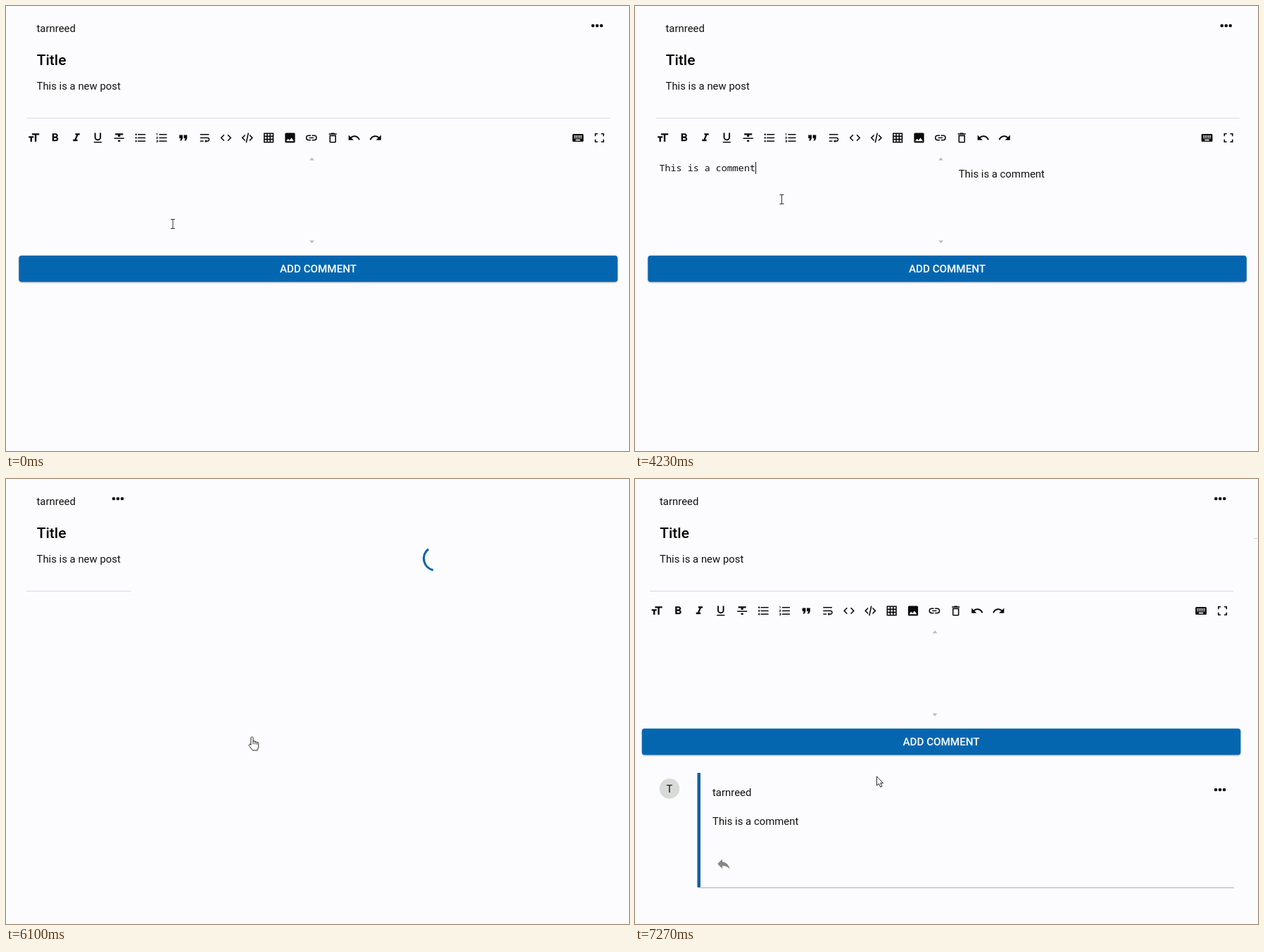
These frames come from a looping animation (885x633 px, 7330 ms). An HTML page:

```html
<!DOCTYPE html>
<html lang="en">
<head>
<meta charset="utf-8">
<title>Adding a comment</title>
<style>
html, body { margin: 0; width: 100%; height: 100%; overflow: hidden; background: #fcfcfe; }
svg { display: block; width: 885px; height: 633px; font: 14.9px Roboto, sans-serif; fill: #111; }
.title { font-size: 21px; font-weight: 500; fill: #000; }
.mono { font: 13.39px "Noto Sans Mono", monospace; white-space: pre; }
.label { font-size: 15.2px; font-weight: 500; fill: #fff; }
.icon { fill: #0a0a0a; fill-rule: evenodd; }
.line { fill: none; stroke: #0a0a0a; stroke-width: 2; }
.arrow { fill: #bcbcb8; }
.pointer { fill: #fff; stroke: #111; stroke-width: .9; stroke-linejoin: round; }
</style>
</head>
<body>
<svg viewBox="0 0 885 633">
  <rect width="885" height="633" fill="#fcfcfe"/>
  <g id="page">
    <text x="43.5" y="37">tarnreed</text>
    <text class="title" x="43.7" y="84">Title</text>
    <text x="43.5" y="119">This is a new post</text>
    <path id="rule" stroke="#d6d7ee"/>
    <g id="menu"><g class="dots"></g></g>
    <g id="editor">
      <g id="tools"></g>
      <path class="arrow" d="M431 219.5l3.5-4 3.5 4zM431 333.5l3.5 4 3.5-4z"/>
      <text id="typed" class="mono" x="34.5" y="235"></text>
      <rect id="caret" y="222" width="1" height="17"/>
      <text id="preview" x="459.7" y="244"></text>
      <rect id="button" x="18.3" y="355" width="850.5" height="37.5" rx="4"/>
      <text class="label" x="443.5" y="378.5" text-anchor="middle">ADD COMMENT</text>
    </g>
  </g>
  <g id="comment">
    <path d="M879 84.5h6" stroke="#cfcfcf"/>
    <circle cx="49" cy="440.5" r="14.3" fill="#d8dad7"/>
    <text x="49" y="446" text-anchor="middle">T</text>
    <rect x="88.5" y="418" width="4.5" height="163" fill="#17609f"/>
    <path d="M93 581.5h758" stroke="#acaec4"/>
    <text x="110" y="450.5">tarnreed</text>
    <text x="110" y="492">This is a comment</text>
    <g transform="translate(831 442)"><g class="dots"></g></g>
    <path transform="translate(126 548) scale(.98) translate(-12 -12.5)" fill="#858583" d="M10 9V5l-7 7 7 7v-4.1c5 0 8.5 1.6 11 5.1-1-5-4-10-11-11z"/>
  </g>
  <path id="spinner" fill="none" stroke="#0566a8" stroke-width="3.2"/>
  <g id="mouse">
    <path id="beam" d="M-3-6.5H3M0-6.5V6.5M-3 6.5H3" fill="none" stroke="#333"/>
    <g id="hand" class="pointer">
      <path d="M-1.6 11V1a1.6 1.6 0 0 1 3.2 0V6.3a1.4 1.4 0 0 1 2.8.4 1.4 1.4 0 0 1 2.6.6 1.2 1.2 0 0 1 2.2.8V13.5L7.6 18.5H.8L-4 12.2a1.5 1.5 0 0 1 2.4-2z"/>
      <path d="M1.6 6.3v3.5M4.4 6.7v3.3M7 7.3v3" fill="none"/>
    </g>
    <path id="arrow" class="pointer" d="M0 0V13l3-2.6 2.2 4.8 2.2-1-2.1-4.6H9z"/>
  </g>
</svg>
<script>
const LOOP = 7330;
const TEXT = "This is a comment";
const KEYS = [1300, 1500, 1640, 1770, 1870, 1970, 2070, 2430, 2700, 3000,
  3370, 3500, 3670, 3810, 3950, 4090, 4220];
const CLEAR = 5775, POSTED = 6230;
// time, x, y of the mouse hotspot
const PATH = [[0, 237, 310], [230, 208.5, 275], [4730, 208.5, 275], [5430, 348.5, 363.5],
  [5500, 348.5, 363.5], [5650, 349.5, 367.5], [6400, 349.5, 367.5], [6730, 347.5, 377.5],
  [6900, 347.5, 377.5], [7270, 343.5, 423]];

const ICONS = [
  "M9 4v3h5v12h3V7h5V4H9zm-6 8h3v7h3v-7h3V9H3v3z",
  "M15.6 10.79c.97-.67 1.65-1.77 1.65-2.79 0-2.26-1.75-4-4-4H7v14h7.04c2.09 0 3.71-1.7 3.71-3.79 0-1.52-.86-2.82-2.15-3.42zM10 6.5h3a1.5 1.5 0 0 1 0 3h-3zm3.5 9H10v-3h3.5a1.5 1.5 0 0 1 0 3z",
  "M10 4v3h2.21l-3.42 8H6v3h8v-3h-2.21l3.42-8H18V4z",
  "M12 17a6 6 0 0 0 6-6V3h-2.5v8a3.5 3.5 0 0 1-7 0V3H6v8a6 6 0 0 0 6 6zm-7 2v2h14v-2z",
  "M10 19h4v-3h-4zM5 4v3h5v3h4V7h5V4zM3 14h18v-2H3z",
  "M2.5 6a1.5 1.5 0 0 1 3 0 1.5 1.5 0 0 1-3 0zm0 6a1.5 1.5 0 0 1 3 0 1.5 1.5 0 0 1-3 0zm0 6a1.5 1.5 0 0 1 3 0 1.5 1.5 0 0 1-3 0zM7 19h14v-2H7zm0-6h14v-2H7zm0-8v2h14V5z",
  "M2 17h2v.5H3v1h1v.5H2v1h3v-4H2zm1-9h1V4H2v1h1zm-1 3h1.8L2 13.1v.9h3v-1H3.2L5 10.9V10H2zm5-6v2h14V5zm0 14h14v-2H7zm0-6h14v-2H7z",
  "M6 17h3l2-4V7H5v6h3zm8 0h3l2-4V7h-6v6h3z",
  "M4 19h6v-2H4zM20 5H4v2h16zm-3 6H4v2h13.25a2 2 0 0 1 0 4H15v-2l-3 3 3 3v-2h2a4 4 0 0 0 0-8z",
  "M9.4 16.6L4.8 12l4.6-4.6L8 6l-6 6 6 6zm5.2 0l4.6-4.6-4.6-4.6L16 6l6 6-6 6z",
  "M12.89 3l1.96.4L11.11 21l-1.96-.4zm6.7 9L16 8.41V5.58L22.42 12 16 18.41v-2.83zM1.58 12L8 5.58v2.83L4.41 12 8 15.58v2.83z",
  "#M4 4h16v16H4zM9.3 4v16M14.7 4v16M4 9.3h16M4 14.7h16",
  "M21 19V5a2 2 0 0 0-2-2H5a2 2 0 0 0-2 2v14a2 2 0 0 0 2 2h14a2 2 0 0 0 2-2zM8.5 13.5l2.5 3 3.5-4.5 4.5 6H5z",
  "M3.9 12A3.1 3.1 0 0 1 7 8.9h4V7H7a5 5 0 0 0 0 10h4v-1.9H7A3.1 3.1 0 0 1 3.9 12zM8 13h8v-2H8zm9-6h-4v1.9h4a3.1 3.1 0 0 1 0 6.2h-4V17h4a5 5 0 0 0 0-10z",
  "M6 19a2 2 0 0 0 2 2h8a2 2 0 0 0 2-2V7H6zM8 9h8v10H8zm7.5-5l-1-1h-5l-1 1H5v2h14V4z",
  "M12.5 8c-2.65 0-5.05.99-6.9 2.6L2 7v9h9l-3.62-3.62c1.39-1.16 3.16-1.88 5.12-1.88 3.54 0 6.55 2.31 7.6 5.5l2.37-.78C21.08 11.03 17.15 8 12.5 8z",
  "M11.5 8c2.65 0 5.05.99 6.9 2.6L22 7v9h-9l3.62-3.62c-1.39-1.16-3.16-1.88-5.12-1.88-3.54 0-6.55 2.31-7.6 5.5l-2.37-.78C2.92 11.03 6.85 8 11.5 8z"
];
const KEY_ROWS = [8, 11].map(y => [5, 8, 11, 14, 17].map(x => `M${x} ${y}h2v2h-2z`).join("")).join("");
const KEYBOARD = "M4 5h16a2 2 0 0 1 2 2v10a2 2 0 0 1-2 2H4a2 2 0 0 1-2-2V7a2 2 0 0 1 2-2zM8 15h8v2H8z" + KEY_ROWS;
const FULLSCREEN = "#M4.75 9V4.75H9M15 4.75h4.25V9M19.25 15v4.25H15M9 19.25H4.75V15";

const $ = id => document.getElementById(id);
const set = (id, attrs) => { for (const k in attrs) $(id).setAttribute(k, attrs[k]); };
const show = (id, on) => { $(id).style.display = on ? "" : "none"; };
const clamp = v => Math.max(0, Math.min(1, v));
const mix = (a, b, k) => a + (b - a) * k;
const ease = k => k * k * (3 - 2 * k);

// A leading # marks an outlined icon
function icon(d, x) {
  const lined = d[0] === "#";
  return `<path class="${lined ? "line" : "icon"}" d="${lined ? d.slice(1) : d}"
    transform="translate(${x} 187.5) scale(.79) translate(-12 -12)"/>`;
}
$("tools").innerHTML = ICONS.map((d, i) => icon(d, 39.3 + 30.35 * i)).join("")
  + icon(KEYBOARD, 812.5) + icon(FULLSCREEN, 843);
for (const g of document.querySelectorAll(".dots"))
  g.innerHTML = [-6, 0, 6].map(x => `<circle cx="${x}" r="2.3"/>`).join("");

function mouseAt(t) {
  const i = PATH.findIndex(p => p[0] > t);
  if (i < 0) return PATH[PATH.length - 1].slice(1);
  const [a, b] = [PATH[i - 1], PATH[i]];
  const k = ease((t - a[0]) / (b[0] - a[0]));
  return [mix(a[1], b[1], k), mix(a[2], b[2], k)];
}

function drawMouse(t) {
  const [x, y] = mouseAt(t);
  const hand = y > 354 && y < 393;
  set("mouse", { transform: `translate(${x} ${y})` });
  show("beam", y < 346);
  show("hand", hand);
  show("arrow", y >= 346 && !hand);
}

function drawButton(t) {
  const ramp = start => ease(clamp((t - start) / 250));
  const k = t < POSTED ? ramp(5450) : ramp(POSTED + 10) - ramp(7010);
  const [r, g, b] = [mix(5, 3, k), mix(102, 71, k), mix(176, 125, k)].map(Math.round);
  set("button", { fill: `rgb(${r},${g},${b})` });
  const lift = (t > 5440 && t < 7010) ? 2 : 1;
  $("button").style.filter = `drop-shadow(0 ${lift}px ${lift * .8}px rgba(0,0,0,.28))`;
}

function drawEditor(t) {
  const n = t < CLEAR ? KEYS.filter(k => k <= t).length : 0;
  const text = TEXT.slice(0, n);
  $("typed").textContent = $("preview").textContent = text;
  const idle = t - (n ? KEYS[n - 1] : 400);
  show("caret", t >= 400 && t < CLEAR && idle % 1050 < 530);
  set("caret", { x: 34.5 + 8.034 * n });
}

function drawSpinner(t) {
  const p = (t - CLEAR) / 1400;
  const grow = ease(clamp(p * 2)), shrink = ease(clamp(p * 2 - 1));
  const turn = p * 2 * Math.PI, unit = 1 / 20.2;
  const from = turn + (15 * grow + 110 * shrink) * unit;
  const size = Math.min((1 + 99 * grow) * unit, 2 * Math.PI - 15 * grow * unit);
  const at = a => `${610.5 + 17 * Math.cos(a)} ${113 + 17 * Math.sin(a)}`;
  set("spinner", { d: `M${at(from)}A17 17 0 ${size > Math.PI ? 1 : 0} 1 ${at(from + size)}` });
}

function draw(t) {
  const loading = t >= CLEAR && t < POSTED, posted = t >= POSTED;
  set("page", { transform: `translate(${posted ? -8.5 : 0} 0)` });
  set("rule", { d: loading ? "M29 159.5H178" : "M29.5 159.5H858.5" });
  set("menu", { transform: `translate(${loading ? 159 : 839.7} 28)` });
  show("editor", !loading);
  show("spinner", loading);
  show("comment", posted);
  drawEditor(t);
  drawButton(t);
  if (loading) drawSpinner(t);
  drawMouse(t);
}

const start = performance.now();
function tick() {
  draw((performance.now() - start) % LOOP);
  requestAnimationFrame(tick);
}
tick();
</script>
</body>
</html>
```
